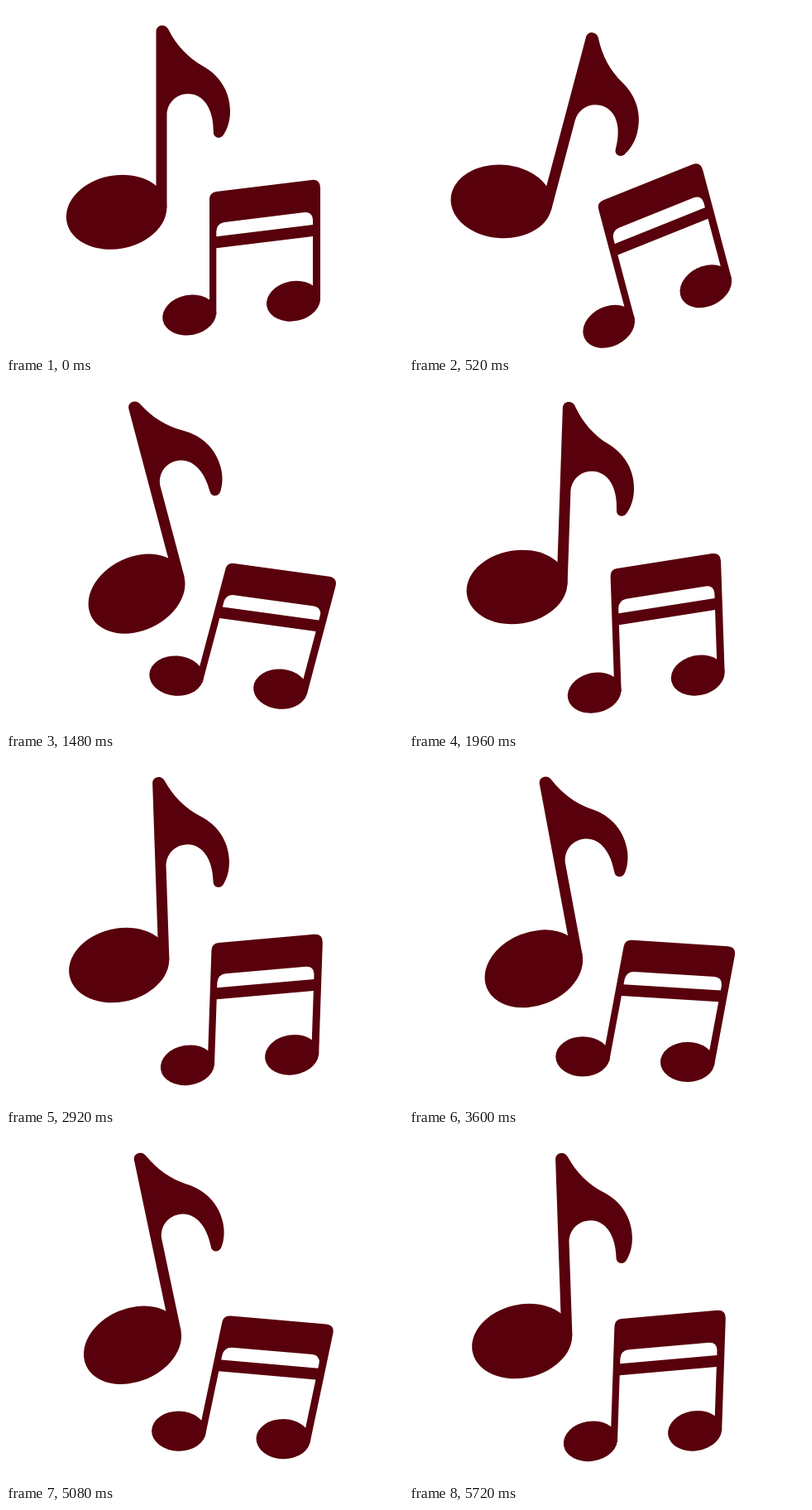
Animation, 480 px wide and 420 px high, one loop 5760 ms. Source, as an HTML page:

```html
<!DOCTYPE html>
<html lang="en">
<head>
<meta charset="utf-8">
<title>Swinging notes</title>
<style>
  html, body { margin: 0; width: 100%; height: 100%; overflow: hidden; background: #fff; }
  svg { display: block; width: 480px; height: 420px; }
</style>
</head>
<body>
<svg viewBox="0 0 480 420" fill="#58000c">
  <g id="single">
    <path d="M181.5 244V31C181.5 22 193.5 20.5 197 29.5C206 47 220 62.5 238 72.5C258 83.5 271 103 271 127
      C271 138 268 148 263 155.5C259 161.5 250.5 159 250.8 152C251 124 239 106 220 106C206 106 194.5 117 194.5 132V244Z"/>
    <ellipse rx="61.3" ry="44.3" transform="translate(133.6 248.8) rotate(-11)"/>
  </g>
  <g id="pair">
    <path fill-rule="evenodd" d="M246 373V233.5Q246 225 254.5 224L369.5 209.9Q380 209 380 219.5V354H371V278L254.3 292.3V373Z
      M254.3 278.3L371 264V258Q370.5 248.5 361 249L264 261Q255 262.5 254.3 272Z"/>
    <ellipse rx="32.8" ry="24.1" transform="translate(221.8 373) rotate(-11)"/>
    <ellipse rx="32.8" ry="24.1" transform="translate(347.5 356.2) rotate(-11)"/>
  </g>
</svg>
<script>
  const PERIOD = 1920, STEP = 40, SWING = 15;
  const [single, pair] = ['single', 'pair'].map(id => document.getElementById(id));
  const turn = (note, angle, x, y) => note.setAttribute('transform', `rotate(${angle} ${x} ${y})`);
  const start = performance.now();

  function draw() {
    const time = Math.floor((performance.now() - start) / STEP) * STEP;
    const angle = SWING * Math.sin(2 * Math.PI * time / PERIOD);
    turn(single, angle, 172, 158.6);
    turn(pair, -angle, 284.5, 303.7);
    requestAnimationFrame(draw);
  }
  draw();
</script>
</body>
</html>
```
